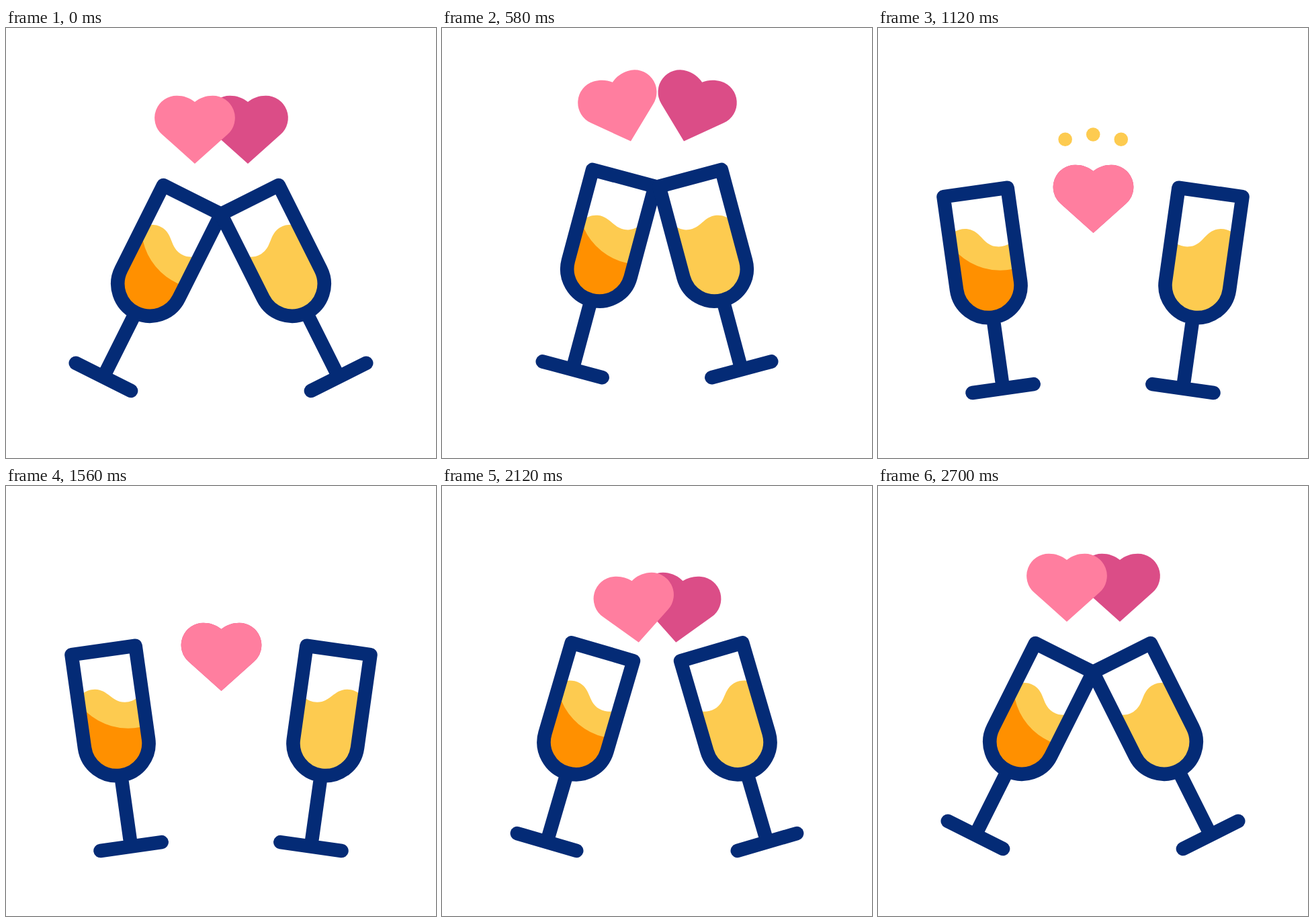
An HTML page for the animation above (3 s loop, 640 by 640 pixels).

```html
<!DOCTYPE html>
<html lang="en">
<head>
<meta charset="utf-8">
<title>Cheers</title>
<style>
  html, body { margin: 0; width: 100%; height: 100%; overflow: hidden; background: #fff; }
  svg { display: block; width: 100%; height: 100%; }
</style>
</head>
<body>
<svg id="stage" viewBox="0 0 640 640"></svg>
<script>
const LOOP = 3000;
const NAVY = '#042b76', PINK = '#ff7e9f', ROSE = '#db4d87', AMBER = '#fdcb50', ORANGE = '#ff9000';
const CENTRE = 320.5;

// The glass is drawn around its middle, the heart around its tip.
const BOWL = 'M-48-147H48V-7A48 48 0 0 1-48-7Z';
const STEM = 'M0 41V148M-46 148H46';
const WAVE = 'M-66 9C-47 9-41-9-22-9S3 9 22 9S47-9 66-9V190H-66Z';
const SHADE = 'M-38-59.5A92 92 0 0 0 38-26H60V60H-60V-59.5Z';
const HEART = 'M0 0L-48.6-43.5A33 33 0 0 1-26.5-101.3C-16.5-101.3-7.5-98 0-92' +
  'C7.5-98 16.5-101.3 26.5-101.3A33 33 0 0 1 48.6-43.5Z';

const glass = (tint) => `
  <g class="glass">
    <g clip-path="url(#bowl)">
      <g class="liquid"><path d="${WAVE}" fill="${AMBER}"/></g>
      ${tint ? `<path d="${SHADE}" fill="${ORANGE}"/>` : ''}
    </g>
    <path d="${BOWL}${STEM}" fill="none" stroke="${NAVY}" stroke-width="20.6"
      stroke-linecap="round" stroke-linejoin="round"/>
  </g>`;

const stage = document.getElementById('stage');
stage.innerHTML = `
  <defs><clipPath id="bowl"><path d="${BOWL}"/></clipPath></defs>
  <rect width="640" height="640" fill="#fff"/>
  ${`<circle class="dot" fill="${AMBER}"/>`.repeat(3)}
  <path class="heart" d="${HEART}" fill="${ROSE}"/>
  <path class="heart" d="${HEART}" fill="${PINK}"/>
  ${glass(true)}
  <g transform="translate(640) scale(-1 1)">${glass(false)}</g>`;

const all = (name) => [...stage.querySelectorAll('.' + name)];
const glasses = all('glass'), liquids = all('liquid'), hearts = all('heart'), dots = all('dot');

// Moments of the toast, in ms.
const LIFT = 200, SPLIT = 600, DROP = 700, APART = 1100, BACK = 1805, CLINK = 2300, REST = 2700;

const span = (t, from, to) => Math.min(1, Math.max(0, (t - from) / (to - from)));
const rise = (t, from, to) => {
  const p = span(t, from, to);
  return p * p * (3 - 2 * p);
};
// Eases 0 to 1 to 0, with the peak at mid.
const swell = (t, from, mid, to) => rise(t, from, mid) - rise(t, mid, to);

const place = (el, x, y, turn) =>
  el.setAttribute('transform', `translate(${x} ${y}) rotate(${turn})`);

function drawGlasses(t) {
  const lift = swell(t, LIFT, SPLIT, APART);
  const away = rise(t, SPLIT, APART) - rise(t, BACK, CLINK);
  const slosh = 6 - 19 * swell(t, LIFT, DROP, APART)
    + 12.5 * (swell(t, DROP, APART, BACK) + swell(t, BACK, CLINK, REST));
  for (const el of glasses) {
    place(el, 211.2 + 21.4 * lift - 45.7 * away, 387 - 21.8 * lift + 3 * away,
      26.6 - 11.7 * lift - 34.6 * away);
  }
  for (const el of liquids) place(el, 0, -78.5, slosh);
}

function drawHearts(t) {
  const lift = swell(t, LIFT, DROP, APART);
  const merge = rise(t, DROP, APART) - rise(t, BACK, CLINK);
  const turn = 20 * lift + 9 * swell(t, BACK, CLINK, REST);
  hearts.forEach((el, i) => {
    const side = i ? -1 : 1;
    place(el, CENTRE + side * 39.5 * (1 - merge), 202 - 39 * lift + 103 * merge, side * turn);
  });
}

function drawDots(t) {
  const p = span(t, 1000, 1400);
  const reach = 64 + 112 * p * (2 - p);
  const radius = t < 1000 ? 0 : 10.3 * (1 - rise(t, 1340, 1500));
  dots.forEach((dot, i) => {
    const a = (i - 1) * 20 * Math.PI / 180;
    dot.setAttribute('cx', 320.2 + reach * Math.sin(a));
    dot.setAttribute('cy', 280 - reach * Math.cos(a));
    dot.setAttribute('r', radius);
  });
}

const start = performance.now();
function tick() {
  const t = (performance.now() - start) % LOOP;
  drawGlasses(t);
  drawHearts(t);
  drawDots(t);
  requestAnimationFrame(tick);
}
tick();
</script>
</body>
</html>
```
